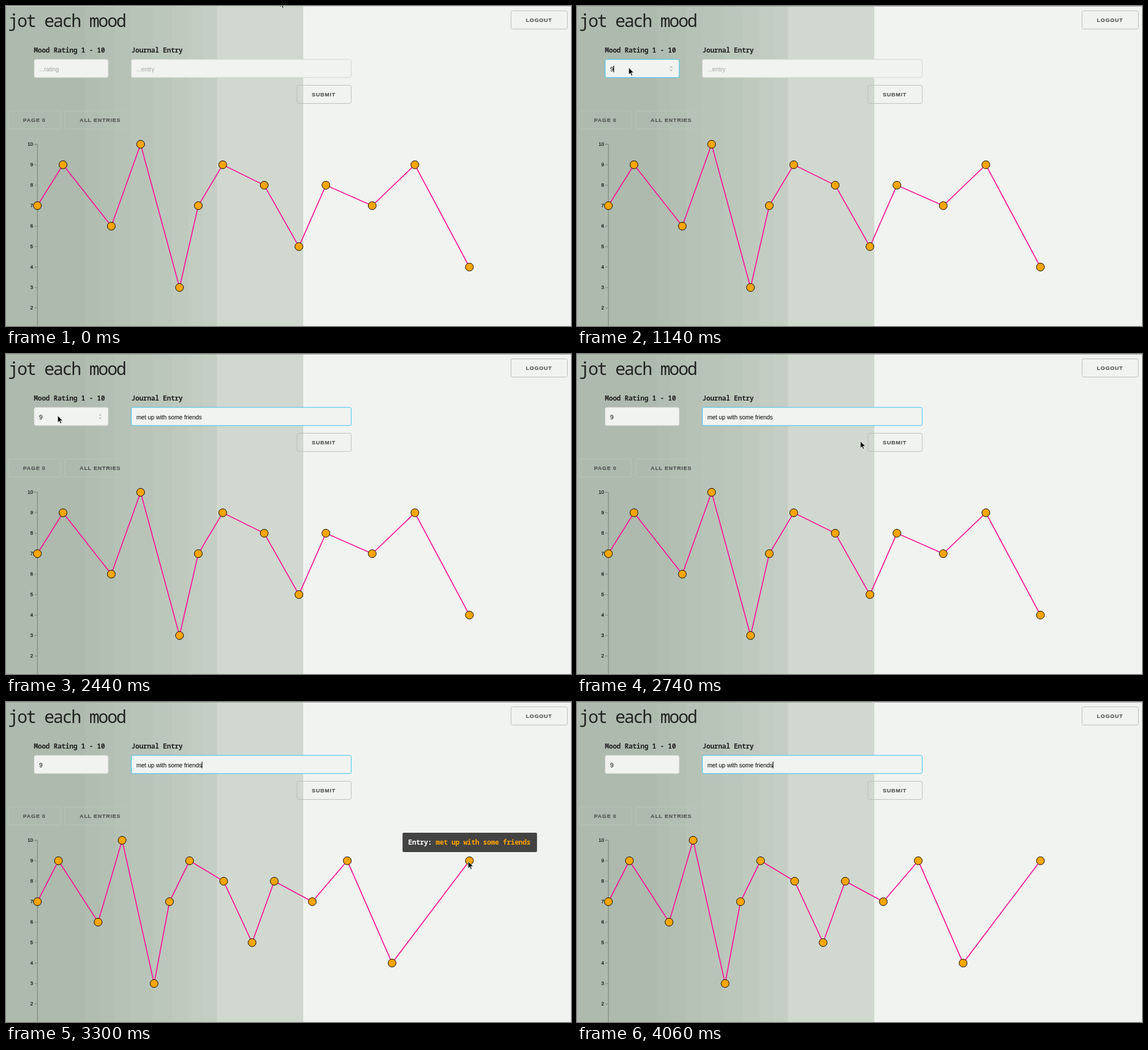
These frames come from a looping animation (994x563 px, 4120 ms). An HTML page:

```html
<!DOCTYPE html>
<html lang="en">
<head>
<meta charset="utf-8">
<title>jot each mood</title>
<style>
html, body { margin: 0; width: 100%; height: 100%; overflow: hidden; background: #f1f3f0; }
svg { display: block; width: 994px; height: 563px; }
text { white-space: pre; }
.title, .label { font-family: "Noto Sans Mono", "DejaVu Sans Mono", monospace; fill: #222; }
.title { font-size: 30px; letter-spacing: -2.15px; }
.label { font-size: 12px; font-weight: 700; letter-spacing: -0.26px; }
.btn, .field, .tick { font-family: "Liberation Sans", Arial, sans-serif; }
.btn { font-size: 9.6px; font-weight: 700; letter-spacing: 0.87px; fill: #555; stroke: #555; stroke-width: 0.2px; }
.field { font-size: 10.35px; fill: #000; }
.hint { fill: #a2a4a1; }
.tick { font-size: 8.66px; text-anchor: end; fill: #000; stroke: #000; stroke-width: 0.15px; }
</style>
</head>
<body>
<svg id="stage" viewBox="0 0 994 563"></svg>
<script>
const LOOP = 4120, STEP = 20, BLINK = 148;
const BLUE = '#33c3f0', GREY = '#d1d3d0', PAPER = '#f1f3f0';
const stage = document.getElementById('stage');

function set(el, attrs) {
  for (const k in attrs) el.setAttribute(k, attrs[k]);
}
function add(tag, attrs, parent = stage, text = '') {
  const el = document.createElementNS('http://www.w3.org/2000/svg', tag);
  set(el, attrs);
  el.textContent = text;
  return parent.appendChild(el);
}
const show = (el, on) => set(el, { visibility: on ? 'visible' : 'hidden' });
const label = (cls, x, y, s, parent) => add('text', { class: cls, x, y }, parent, s);
const box = (x, y, w, stroke, fill = 'none') =>
  add('rect', { x: x + 0.5, y: y + 0.5, width: w - 1, height: 32, rx: 3, stroke, fill });

// Background: one step per band, from dark to light green
const band = (x, fill) => add('rect', { x, y: 0, width: 994 - x, height: 563, fill });
[0, 140, 165, 192, 219, 258, 292, 321, 347].forEach((x, i) =>
  band(x, `rgb(${173 + 3 * i}, ${186 + 2.5 * i}, ${173 + 2.9 * i})`));
band(371, '#d1d8cf');
band(523, PAPER);
const topLine = add('rect', { x: 0, y: 0, width: 994, height: 1 });

// Form and buttons
label('title', 3.8, 37, 'jot each mood');
label('label', 49, 82, 'Mood Rating 1 - 10');
label('label', 220.5, 82, 'Journal Entry');
const rateBox = box(49, 93.4, 131.4, GREY, PAPER);
const noteBox = box(220, 93.4, 387.8, GREY, PAPER);
const rateText = label('field', 58.5, 114.5, '');
const noteText = label('field', 229.5, 114.5, '');
const caret = add('rect', { y: 105, width: 1.2, height: 11.5 });
const spinner = add('path', {
  d: 'M164 108.3l1.7-1.7 1.7 1.7M164 112l1.7 1.7 1.7-1.7',
  fill: 'none', stroke: '#666', 'stroke-width': 0.9
});
function button(x, y, w, stroke, s) {
  box(x, y, w, stroke);
  label('btn', x + 26.6, y + 20.4, s);
}
button(888, 8, 100, '#bbbdba', 'LOGOUT');
button(511.4, 139, 96.4, '#bbbfba', 'SUBMIT');
button(3.4, 184, 93, '#b9c4b8', 'PAGE 0');
button(103, 184, 126, '#bac5b9', 'ALL ENTRIES');

// Chart
const rateY = v => 603 - 36 * v;
const chart = add('g', { transform: 'translate(.3 .3)' });
add('path', { d: 'M49 243H55V563', fill: 'none', stroke: '#7f8a7f', 'stroke-width': 1.2 }, chart);
for (let v = 10; v >= 2; v--) {
  add('path', { d: `M49.5 ${rateY(v)}H55`, stroke: '#7f8a7f' }, chart);
  label('tick', 47.3, rateY(v) + 3, v, chart);
}
const rates = [7, 9, 6, 10, 3, 7, 9, 8, 5, 8, 7, 9, 4, 9];
const days = [55, 100, 185, 236.5, 305, 338, 381, 454, 515, 562.5, 644, 719, 815];
const squeezed = days.map(x => 55 + (x - 55) * 0.821).concat(815);
const line = add('path', { fill: 'none', stroke: '#fc0c94', 'stroke-width': 1.7 }, chart);
const dots = rates.map(v =>
  add('circle', { cy: rateY(v), fill: '#ffa500', stroke: '#000' }, chart));

// Tooltip and pointer
const note = 'met up with some friends';
const tip = add('g', {});
add('rect', { x: 697.6, y: 230, width: 236.6, height: 34, rx: 2, opacity: 0.72 }, tip);
const tipText = label('label', 707.5, 251, '', tip);
tipText.style.fill = '#fff';
add('tspan', {}, tipText, 'Entry: ');
add('tspan', { fill: '#ffa500' }, tipText, note);
const cursor = add('path', {
  d: 'M0 0V12.2L2.8 9.6 4.7 14 6.7 13.1 4.8 8.8H8.8Z', stroke: '#fff', 'stroke-width': 0.8
});

// Moments of the story, in ms
const WAKE = 470, CLICK = 790, RATE = 1140, TAB = 1280, TYPE = 1401, KEY = 38.2, SEND = 2780;
const moves = [
  [80, 482, -10], [400, 88, 117], [480, 80, 106], [640, 80, 106], [740, 91, 108.5],
  [2610, 91, 108.5], [2770, 540, 158], [2900, 507, 198.5], [3180, 813, 280.5],
  [3600, 813, 280.5], [4060, 515, -13]
];
const clamp = v => Math.min(1, Math.max(0, v));
const ramp = (t, from, to) => clamp((t - from) / (to - from));
const smooth = p => p * p * (3 - 2 * p);
const cubic = p => p < 0.5 ? 4 * p ** 3 : 1 - 4 * (1 - p) ** 3;

function pointer(t) {
  let [, x, y] = moves[0];
  for (let i = 1; i < moves.length; i++) {
    const [from, x0, y0] = moves[i - 1], [to, x1, y1] = moves[i];
    const e = smooth(ramp(t, from, to));
    x += (x1 - x0) * e;
    y += (y1 - y0) * e;
  }
  return [x, y];
}

function fill(el, value, hint) {
  el.textContent = value || hint;
  set(el, { class: value ? 'field' : 'field hint' });
}

function drawForm(t, x, y) {
  const awake = t >= WAKE;
  const onRate = t >= CLICK && t < TAB;
  const count = Math.min(note.length, Math.max(0, Math.floor((t - TYPE) / KEY) + 1));
  const rating = t >= RATE ? '9' : '', typed = note.slice(0, count);

  set(topLine, { fill: awake ? '#a5a7a4' : '#cdd0cc' });
  set(rateBox, { stroke: onRate ? BLUE : GREY });
  set(noteBox, { stroke: awake && !onRate ? BLUE : GREY });
  fill(rateText, rating, '...rating');
  fill(noteText, typed, '...entry');

  // The blink restarts with each click or key
  const lastKey = count ? TYPE + KEY * (count - 1) : 0;
  const last = Math.max(...[WAKE, CLICK, RATE, TAB, lastKey].filter(e => e <= t));
  const text = onRate ? rateText : noteText;
  const width = (onRate ? rating : typed) ? text.getComputedTextLength() : 0;
  set(caret, { x: (onRate ? 58.2 : 229.2) + width });
  show(caret, awake && Math.floor((t - last) / BLINK) % 2 === 0);
  show(spinner, x > 49 && x < 180 && y > 94 && y < 126);
}

function drawChart(t) {
  const xs = t >= SEND ? squeezed : days;
  set(line, { d: 'M' + xs.map((x, i) => `${x} ${rateY(rates[i])}`).join('L') });
  dots.forEach((dot, i) => {
    const r = t >= SEND ? 7 * cubic(clamp((t - SEND - 8 - i * 5.2) / 80)) : 7;
    show(dot, i < xs.length && r > 0);
    set(dot, { cx: xs[i] || 0, r });
  });
  set(tip, { opacity: ramp(t, 3160, 3280) - ramp(t, 3620, 3760) });
}

const start = performance.now();
function frame() {
  const t = Math.floor(((performance.now() - start) % LOOP) / STEP) * STEP;
  const [x, y] = pointer(t);
  drawForm(t, x, y);
  drawChart(t);
  set(cursor, { transform: `translate(${x} ${y})` });
  requestAnimationFrame(frame);
}
frame();
</script>
</body>
</html>
```
